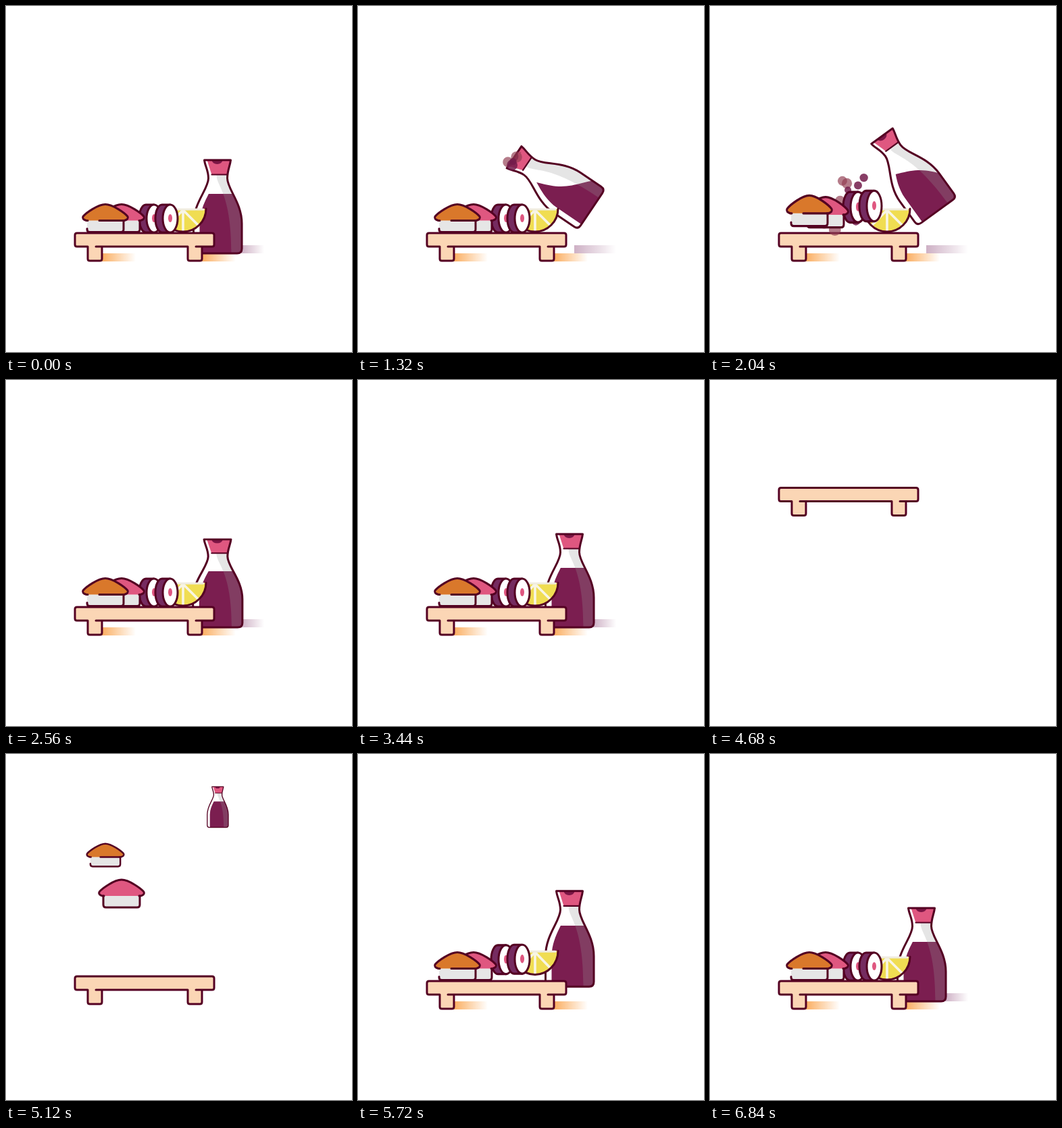
These frames come from a looping animation (512 px wide and 512 px high, 6880 ms). An HTML page with a canvas:

```html
<!DOCTYPE html>
<html>
<head>
<meta charset="utf-8">
<style>
html, body { margin: 0; width: 100%; height: 100%; overflow: hidden; background: #fff; }
canvas { display: block; }
</style>
</head>
<body>
<canvas id="stage" width="512" height="512"></canvas>
<script>
const ctx = document.getElementById('stage').getContext('2d');
const LOOP = 6880, EXIT = 3600, CLEAR = 4320, SKY = 107;
const LINE = '#540022', PINK = '#df5780', SOY = '#7b1e50', RICE = '#e6e6e6';

const clamp = (v, a = 0, b = 1) => Math.min(b, Math.max(a, v));
const span = (t, start, length) => clamp((t - start) / length);
const arc = u => 4 * u * (1 - u);
const path = d => new Path2D(d);

function fill(shape, color) {
  ctx.fillStyle = color;
  ctx.fill(shape);
}
function line(shape, color = LINE, width = 3) {
  ctx.strokeStyle = color;
  ctx.lineWidth = width;
  ctx.stroke(shape);
}
function oval(x, y, rx, ry = rx) {
  const p = new Path2D();
  p.ellipse(x, y, rx, ry, 0, 0, 7);
  return p;
}
function shadow(x, y, width, rgb, alpha) {
  const g = ctx.createLinearGradient(x, 0, x + width, 0);
  g.addColorStop(0, `rgba(${rgb},${alpha})`);
  g.addColorStop(1, `rgba(${rgb},0)`);
  ctx.fillStyle = g;
  ctx.fillRect(x, y, width, 12);
}

// Every shape below stands on its base at the local origin.
const topping = path('M-26 -17H-28Q-35 -19 -33 -23C-29 -28 -11 -41 0 -41C11 -41 29 -28 33 -23Q35 -19 28 -17H26');
const riceFill = path('M-27 -17H27V-3Q27 0 24 0H-24Q-27 0 -27 -3Z');
const riceFull = path('M-27 -17V-4Q-27 0 -23 0H23Q27 0 27 -4V-17');
const riceOpen = path('M-27 -5V-4Q-27 0 -23 0H23Q27 0 27 -4V-17M-9 -17H27');

function sushi(color, rice) {
  fill(riceFill, RICE);
  fill(topping, color);
  line(rice);
  line(topping);
}

const rollSide = path('M5 -41H-7A10 20.5 0 0 0 -7 0H5Z');
function roll() {
  const face = oval(5, -20.5, 11, 20.5);
  fill(rollSide, '#752b60');
  line(rollSide);
  fill(face, '#fff');
  line(face);
  fill(oval(5, -21, 3, 6), PINK);
}

const wedge = path('M34 -34A34 34 0 0 1 -34 -34Z');
const rind = path('M34 -34A34 34 0 0 1 -34 -34');
const spokes = path('M0 -32V-1M0 -32L23 -9M0 -32L-23 -9');
function lemon() {
  fill(wedge, '#f0dd52');
  line(spokes, '#f8f5e4', 3.6);
  line(path('M-33 -33H30'), '#f0ecdf', 3);
  line(rind);
}

const board = path('M-103 -41H103V-21H-103Z');
const legs = path('M-84 -22H-63V0H-84ZM64 -22H85V0H64Z');
const trayLine = path('M-84 -21H-100q-3 0 -3 -3V-38q0 -3 3 -3H100q3 0 3 3V-24q0 3 -3 3H76M-72 -21H64' +
  'M-84 -21V-3q0 3 3 3h15q3 0 3 -3V-21M64 -21V-3q0 3 3 3h15q3 0 3 -3V-21');
function tray() {
  fill(board, '#fbd6b5');
  fill(legs, '#fbd6b5');
  line(trayLine);
}

// Bottle shapes are centred so that it can turn about its middle.
const glass = path('M-20 -69H19C18 -60 14 -54 14 -42C14 -26 35.5 -6 35.5 25V62Q35.5 69 28.5 69H-29Q-36 69 -36 62V25C-36 -6 -14 -26 -14 -42C-14 -54 -19 -60 -20 -69Z');
const inside = path('M-4 -47C-5 -25 -26 -8 -27 25V68H40V-47Z');
const shade = path('M-2 -47C-2 -30 20 -20 20 69H40V-47Z');
const cap = path('M-16 -69L-9 -47H22V-69Z');

function bottle(turn, t) {
  const angle = turn * Math.PI / 180, tilt = clamp(-turn / 36);
  const level = -19 + 19 * tilt, phase = 1 - 3.3 * (t - 1320) / 720;
  ctx.translate(0, -69);
  ctx.rotate(angle);
  fill(glass, '#fff');
  ctx.save();
  ctx.clip(glass);
  ctx.save();
  ctx.clip(inside);
  ctx.rotate(-angle);
  ctx.beginPath();
  ctx.moveTo(-120, 120);
  for (let x = -120; x <= 120; x += 4) ctx.lineTo(x, level + 5 * tilt * Math.sin(x / 20 + phase));
  ctx.lineTo(120, 120);
  ctx.fillStyle = SOY;
  ctx.fill();
  ctx.restore();
  fill(shade, 'rgba(150,150,150,.25)');
  fill(cap, PINK);
  fill(oval(-1, -69, 8, 6), '#7b1545');
  line(path('M-9 -47.5H14'), LINE, 2.2);
  ctx.restore();
  line(glass);
}

// time, dx, dy, degrees
const flight = [
  [480, 0, 0, 0], [700, 0, -8, -2], [1000, -10, -50, -20], [1320, -25, -35, -56],
  [1560, -20, -52, -38], [1780, -25, -38, -56], [2040, -18, -49, -36],
  [2240, -8, -26, -14], [2480, 0, 0, 0]
];
function flightAt(t) {
  const i = flight.findIndex(k => k[0] > t);
  if (i < 1) return [0, 0, 0];
  const a = flight[i - 1], b = flight[i];
  const u = span(t, a[0], b[0] - a[0]), e = u * u * (3 - 2 * u);
  return [1, 2, 3].map(n => a[n] + (b[n] - a[n]) * e);
}

// Pop up in the air, fall, squash and bounce once.
function entrance(o, t) {
  const age = t - o.start, land = o.start + o.fall;
  const size = Math.sin(Math.PI / 2 * clamp(age / 240));
  const squash = Math.sin(Math.PI * span(t, land, o.rest)) * o.give;
  const jump = arc(span(t, land + o.rest, o.air));
  return {
    show: age > 0,
    y: SKY + (o.base - SKY) * clamp(age / o.fall) ** 3 - o.hop * jump,
    sx: size * (1 + squash * .5),
    sy: size * (1 - squash + o.give * .3 * jump)
  };
}

function pose(o, t) {
  if (t >= CLEAR) return entrance(o, t);
  let lift = 0;
  for (const start of [1560, 1885, 3910]) lift += arc(span(t, start + (o.lag || 0), 330));
  return { show: true, y: o.base - (o.lift || 0) * lift, sx: 1, sy: 1 + (o.lift ? .1 : 0) * lift };
}

function draw(o, t, dx, paint) {
  const p = pose(o, t);
  if (!p.show) return;
  ctx.save();
  ctx.translate(o.x + dx, p.y);
  ctx.scale(p.sx, p.sy);
  paint();
  ctx.restore();
}

const item = (x, base, start, fall, more) =>
  ({ x, base, start, fall, rest: 130, air: 320, hop: 10, give: .16, ...more });
const trayItem = item(205, 377, 4400, 400, { rest: 140, hop: 7, give: 0 });
const bottleItem = item(313.5, 366, 5052, 370, { rest: 180, air: 400, hop: 26, give: .1 });
const food = [
  [item(262, 334, 5250, 260), lemon],
  [item(214, 335, 5130, 260, { lift: 15, lag: 12 }), roll],
  [item(238, 335, 5190, 260, { lift: 16.5 }), roll],
  [item(171, 334.5, 4885, 292, { lift: 7, lag: 15 }), () => sushi(PINK, riceFull)],
  [item(147, 334.5, 4974, 230, { lift: 9 }), () => sushi('#d9782b', riceOpen)]
];

const noise = n => { const v = Math.sin(n * 127.1 + 11.7) * 43758.5453; return v - Math.floor(v); };
function drops(t) {
  for (let i = 0; i < 36; i++) {
    const born = 1250 + i * 17, age = (t - born) / 1000;
    if (age < 0 || age > .42) continue;
    const [mx, my, turn] = flightAt(born), a = turn * Math.PI / 180;
    const x = 308 + mx + 69 * Math.sin(a) + 16 * noise(i + 20) - (20 + 180 * noise(i)) * age;
    const y = 297 + my - 69 * Math.cos(a) - 10 + 28 * noise(i + 50) + 760 * age * age;
    if (y > 336) continue;
    const r = (5 + 4 * noise(i + 90)) * clamp(age / .03);
    fill(oval(x, y, r), i % 2 ? 'rgba(115,28,75,.85)' : 'rgba(146,62,82,.68)');
  }
}

function render(t) {
  ctx.clearRect(0, 0, 512, 512);
  ctx.lineCap = ctx.lineJoin = 'round';
  const entering = t >= CLEAR;
  const slide = entering ? 0 : 370 * span(t, EXIT, CLEAR - EXIT) ** 3;
  const [dx, dy, turn] = entering ? [0, 0, 0] : flightAt(t);

  const trayShade = entering ? span(t, 5280, 320) : 1;
  const bottleShade = entering ? span(t, 5880, 500) : 1 - .45 * clamp(-dy / 30);
  for (const x of [142, 290]) shadow(x - slide, 366, 50, '250,165,80', trayShade * .9);
  shadow(320 + slide, 354, 62, '155,95,137', bottleShade * .9);

  const dip = .05 * Math.sin(Math.PI * span(t, 260, 260)) + .06 * Math.sin(Math.PI * span(t, 2480, 200));
  draw(bottleItem, t, dx + slide, () => {
    ctx.translate(0, dy);
    ctx.scale(1 + dip * .4, 1 - dip);
    bottle(turn, t);
  });
  draw(trayItem, t, -slide, tray);
  drops(t);
  for (const [o, paint] of food) draw(o, t, -slide, paint);
}

function tick() {
  render(performance.now() % LOOP);
  requestAnimationFrame(tick);
}
tick();
</script>
</body>
</html>
```
